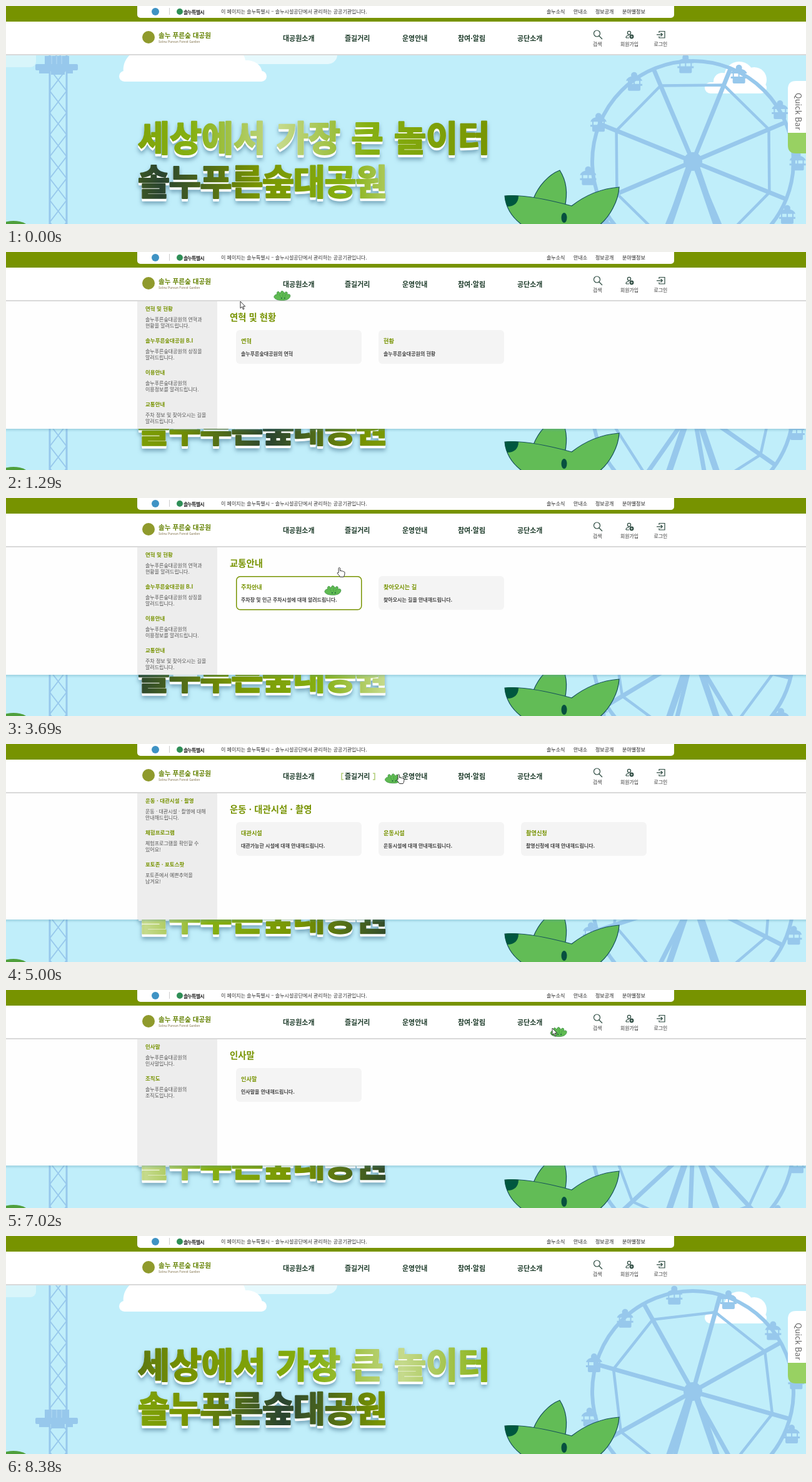
Animation, 1280 px wide and 349 px high, one loop 8.45 s. Source, as an HTML page:

```html
<!DOCTYPE html>
<html lang="ko">
<head>
<meta charset="utf-8">
<title>솔누푸른숲대공원</title>
<style>
html, body { margin: 0; width: 100%; height: 100%; overflow: hidden; background: #c0eefa; }
svg { display: block; width: 1280px; height: 349px; font-family: "Noto Sans CJK KR", "Noto Sans CJK", "Noto Sans", sans-serif; }
text { white-space: pre; }
#title { font-size: 55.5px; font-weight: 900; stroke-width: 2.5; stroke-linejoin: round;
  filter: drop-shadow(0 4px 0 #fff) drop-shadow(0 4px 3px rgba(50, 100, 130, .5)); }
</style>
</head>
<body>
<svg id="stage" viewBox="0 0 1280 349"></svg>
<script>
const LOOP = 8450, GREEN = '#779300', BLUE = '#97c8ec', PARK = '솔누푸른숲대공원';
const $ = id => document.getElementById(id);
const clamp = v => Math.max(0, Math.min(1, v));
const wave = (t, period) => Math.cos(2 * Math.PI * t / period);
const set = (id, attrs) => { for (const k in attrs) $(id).setAttribute(k, attrs[k]); };
const move = (id, x, y) => set(id, { transform: `translate(${x} ${y})` });

const label = (x, y, size, str, fill = '#333', weight = 400, more = '') =>
  `<text x="${x}" y="${y}" font-size="${size}" fill="${fill}" font-weight="${weight}" ${more}>${str}</text>`;
const box = (x, y, w, h, fill, r = 0, more = '') =>
  `<rect x="${x}" y="${y}" width="${w}" height="${h}" rx="${r}" fill="${fill}" ${more}/>`;

// Each menu: label, x, centre, items of [name, two lines, cards]
const menus = [
  ['대공원소개', 443, 468, [
    ['연혁 및 현황', `${PARK}의 연혁과`, '현황을 알려드립니다.',
      [['연혁', `${PARK}의 연혁`], ['현황', `${PARK}의 현황`]]],
    [`${PARK} B.I`, `${PARK}의 상징을`, '알려드립니다.',
      ['로고', '캐릭터', '상징'].map(s => [`${PARK} ${s}`, `솔누푸른숲 대공원의 ${s}`])],
    ['이용안내', `${PARK}의`, '이용정보를 알려드립니다.',
      [['이용안내', '이용정보를 안내해드립니다.']]],
    ['교통안내', '주차 정보 및 찾아오시는 길을', '알려드립니다.',
      [['주차안내', '주차장 및 인근 주차시설에 대해 알려드립니다.'],
       ['찾아오시는 길', '찾아오시는 길을 안내해드립니다.']]]]],
  ['즐길거리', 542, 562, [
    ['운동 · 대관시설 · 촬영', '운동 · 대관시설 · 촬영에 대해', '안내해드립니다.',
      [['대관시설', '대관가능한 시설에 대해 안내해드립니다.'],
       ['운동시설', '운동시설에 대해 안내해드립니다.'],
       ['촬영신청', '촬영신청에 대해 안내해드립니다.']]],
    ['체험프로그램', '체험프로그램을 확인할 수', '있어요!'],
    ['포토존 · 포토스팟', '포토존에서 예쁜추억을', '남겨요!']]],
  ['운영안내', 634, 654, [
    ['운영시간', `${PARK}의`, '운영시간입니다.', [['운영시간', '운영시간을 안내해드립니다.']]],
    ['편의시설', '편의시설을 확인할 수', '있어요!']]],
  ['참여·알림', 723, 745, [
    ['공지사항', `${PARK}의`, '소식을 알려드립니다.', [['공지사항', '공지사항을 안내해드립니다.']]],
    ['참여마당', '함께하는 행사를', '알려드립니다.']]],
  ['공단소개', 818, 838, [
    ['인사말', `${PARK}의`, '인사말입니다.', [['인사말', '인사말을 안내해드립니다.']]],
    ['조직도', `${PARK}의`, '조직도입니다.']]]
];

// Pointer path: time, x, y
const path = [[100, 1010, 380], [500, 445, 58], [540, 445, 58], [650, 458, 53], [1050, 458, 55],
  [1500, 303, 100], [1900, 296, 124], [2220, 282, 180], [2600, 268, 250], [2750, 278, 258],
  [3300, 485, 177], [3690, 531, 111], [3950, 560, 53], [4450, 566, 50], [5000, 626, 48],
  [5300, 655, 50], [5600, 720, 50], [6010, 745, 52], [6600, 830, 54], [6720, 874, 61],
  [7020, 874, 61], [7200, 880, 66], [7650, 960, 300], [7800, 990, 400]];

function pointer(t) {
  const i = path.findIndex(p => p[0] > t);
  if (i === 0) return path[0].slice(1);
  if (i < 0) return path[path.length - 1].slice(1);
  const [a, x, y] = path[i - 1], [b, x2, y2] = path[i], k = (t - a) / (b - a);
  return [x + (x2 - x) * k, y + (y2 - y) * k];
}

// The leaf trails the pointer: mean of its recent places
function leafAt(t) {
  let x = 13, y = 7;
  for (let k = 0; k < 10; k++) {
    const p = pointer(t - 40 * k);
    x += p[0] / 10;
    y += p[1] / 10;
  }
  return [x, y];
}

function sky() {
  let braces = '';
  for (let y = 66; y < 349; y += 35) braces += `M70 ${y}L97 ${y + 35}M97 ${y}L70 ${y + 35}`;
  let spokes = '', rim = [];
  for (let i = 0; i < 8; i++) {
    const a = (22 + 45 * i) * Math.PI / 180, x = 132 * Math.sin(a), y = -132 * Math.cos(a);
    spokes += `M0 0L${x * 1.22} ${y * 1.22}`;
    rim.push(`${x},${y}`);
  }
  const cars = Array.from({ length: 12 }, (_, i) => `<use href="#car" id="car${i}"/>`).join('');
  return `
  ${box(0, 0, 1280, 349, '#c0eefa')}
  ${box(-20, 60, 68, 38, '#d8f5fa', 9)}
  ${box(340, 60, 190, 33, '#e6f9fd', 15)}
  <g fill="#fff">
    ${box(181, 104, 236, 17, '#fff', 8.5)}
    <path d="M188 108C186 88 196 78 210 70H368C378 74 382 80 383 87C399 86 410 96 410 108Z"/>
    ${box(1118, 122, 99, 18, '#fff', 9)}
    <circle cx="1173" cy="113" r="24"/><circle cx="1197" cy="118" r="20"/><circle cx="1146" cy="121" r="14"/>
  </g>
  <g fill="none" stroke="${BLUE}">
    <path d="${braces}" stroke-width="1.8"/><path d="M70 78V349M97 78V349" stroke-width="3"/>
  </g>
  <g id="lift">
    ${box(62, 80, 39, 14, BLUE)}${box(47, 93, 68, 10, BLUE, 2)}${box(53, 102, 16, 6, BLUE)}
    ${box(72, 102, 22, 8, BLUE)}${box(97, 102, 10, 6, BLUE)}
    <path d="M73 80V93M81 80V93M89 80V93" stroke="#b4dcf4"/>
  </g>
  <g fill="none" stroke="${BLUE}">
    <circle cx="1099" cy="249" r="161" stroke-width="6"/>
    <g id="wheel"><path d="${spokes}" stroke-width="7"/>
      <polygon points="${rim.join(' ')}" stroke-width="4.5"/></g>
    <path d="M1096 249L1058 360M1102 249L1140 360" stroke-width="10"/>
  </g>
  <circle cx="1099" cy="249" r="15" fill="${BLUE}"/>
  ${cars}
  <ellipse cx="12" cy="358" rx="26" ry="14" fill="#4f9f3c"/>
  <g id="title">
    ${label(211, 225, 55.5, '세상에서 가장 큰 놀이터', 'url(#g1)', 900, 'stroke="url(#g1)" word-spacing="2"')}
    ${label(211, 295, 55.5, PARK, 'url(#g2)', 900, 'stroke="url(#g2)" letter-spacing="-1.3"')}
  </g>
  <g fill="#62bc56" stroke="#14505a" stroke-width="1.2">
    <path d="M844 308C852 288 868 270 886 263C897 280 899 300 894 322Z"/>
    <path d="M798 304C830 301 872 311 905 320C928 302 955 292 981 290C980 312 966 338 948 352H828C812 341 800 325 798 304Z"/>
    <path d="M798 304Q808 302 820 304C820 315 813 321 802 321Q798 312 798 304Z" fill="#00573f" stroke="none"/>
    <ellipse cx="893" cy="339" rx="4.5" ry="8" fill="#07503f" stroke="none"/>
  </g>
  <path d="M1280 120H1264Q1251 120 1251 133V203H1280Z" fill="#fff"/>
  <path d="M1280 236H1264Q1251 236 1251 223V203H1280Z" fill="#98d162"/>
  ${label(0, 0, 13, 'Quick Bar', '#666', 500, 'transform="translate(1263 139) rotate(90)"')}`;
}

function header() {
  const links = [[865, '솔누소식'], [908, '안내소'], [943, '정보공개'], [986, '분야별정보']];
  return `
  ${box(0, 0, 1280, 25, GREEN)}
  ${box(210, -8, 859, 27, '#fff', 5)}
  <circle cx="239" cy="9" r="6" fill="#3f93c4"/>
  <path d="M261.5 3V14" stroke="#ccc"/>
  <circle cx="278" cy="9" r="5" fill="#2f8f57"/>
  ${label(284, 13, 8, '솔누특별시', '#222', 700, 'letter-spacing="-.8"')}
  ${label(344, 12, 8, '이 페이지는 솔누특별시 – 솔누시설공단에서 관리하는 공공기관입니다.')}
  ${links.map(([x, s]) => label(x, 12, 8, s, '#222', 500)).join('')}
  ${box(0, 25, 1280, 53, '#fff')}${box(0, 77, 1280, 2, '#d9d9d9')}
  <circle cx="228" cy="50" r="10" fill="#8f9a2c"/>
  ${label(244, 51, 10.6, '솔누 푸른숲 대공원', '#648200', 700)}
  ${label(244, 59, 5, 'Solnu Pureun Forest Garden', '#7a6a40')}
  ${menus.map(([s, x]) => label(x, 56, 11, s, '#1d3b2a', 700)).join('')}
  <g fill="none" stroke="#2c4a40" stroke-width="1.2">
    <circle cx="945.5" cy="44" r="5"/><path d="M949 48L954 53"/>
    <circle cx="997" cy="43" r="2.6"/><path d="M992 51Q992 47 997 47M992 51H997"/>
    <circle cx="1001" cy="49" r="2.8" fill="#2c4a40"/><path d="M999.5 49H1002.5M1001 47.5V50.5" stroke="#fff" stroke-width=".8"/>
    <path d="M1045 43V40.500H1054V51H1045V48.500M1041 45.800H1050M1047.500 43L1050.300 45.800L1047.500 48.600"/>
  </g>
  ${[[939, '검색'], [983, '회원가입'], [1036.5, '로그인']].map(([x, s]) => label(x, 64, 7.9, s)).join('')}
  <path id="brackets" d="M-22 47H-25V57H-22M25 47H28V57H25" fill="none" stroke="#b4cf7c" stroke-width="1.6"/>`;
}

// Drop-down sheet for one menu, with the hovered side item and card lit
function sheet(menu, item, lit, card) {
  const items = menus[menu][3], [name, , , cards] = items[item];
  let s = box(0, 79, 1280, 205, '#fefefe') + box(210, 79, 128, 205, '#ededed');
  if (lit >= 0) s += box(210, 79 + 51 * lit, 128, 51, '#fff');
  items.forEach(([a, b, c], i) => {
    const y = 51 * i;
    s += label(223, 94 + y, 8.5, a, GREEN, 700) + label(223, 111 + y, 8, b, '#555') + label(223, 121 + y, 8, c, '#555');
  });
  s += label(358, 110, 14.4, name, GREEN, 700);
  cards.forEach(([a, b], i) => {
    const x = 368 + 228 * i;
    s += i === card ? box(x + .75, 125.75, 200, 53, '#fff', 6, `stroke="${GREEN}" stroke-width="1.5"`)
                    : box(x, 125, 201, 54, '#f4f4f4', 6);
    s += label(x + 8, 146, 9.2, a, GREEN, 700) + label(x + 8, 166, 8, b, '#444', 700);
  });
  return s;
}

const stops = [[0, '#2a4430'], [.38, '#779300'], [.75, '#86b012'], [1, '#c5da8c']]
  .map(([o, c]) => `<stop offset="${o}" stop-color="${c}"/>`).join('');
const gradient = id =>
  `<linearGradient id="${id}" gradientUnits="userSpaceOnUse" spreadMethod="reflect" y1="0" y2="0">${stops}</linearGradient>`;

$('stage').innerHTML = `
<defs>${gradient('g1')}${gradient('g2')}
  <linearGradient id="shade" x2="0" y2="1"><stop stop-color="#4a90a8" stop-opacity=".3"/><stop offset="1" stop-color="#4a90a8" stop-opacity="0"/></linearGradient>
  <clipPath id="clip"><rect id="slot" y="79" width="1280" height="0"/></clipPath>
  <g id="car" fill="${BLUE}">
    <circle cy="3" r="5"/><path d="M-13 12Q-11 5 0 4Q11 5 13 12Z"/>
    <path d="M-9 11V18M9 11V18M0 11V18" stroke="${BLUE}" stroke-width="2"/>
    <path d="M-13 17H13V20H10V26Q10 28 8 28H-8Q-10 28 -10 26V20H-13Z"/>
  </g>
</defs>
${sky()}
<g id="sheet" clip-path="url(#clip)"></g>
<rect id="edge" width="1280" height="5" fill="url(#shade)"/>
${header()}
<g id="leaf">
  <path d="M-13 2C-13 -1 -10 -3 -8 -2C-9 -5 -8 -7 -6 -7Q-4 -6 -3 -4Q-2 -8 0 -8Q3 -7 3 -4Q6 -8 8 -6Q9 -4 8 -2Q13 -4 13 0C12 5 7 7 1 7C-6 7 -11 6 -13 2Z" fill="#5fba52" stroke="#3a8f40" stroke-width=".8"/>
  <path d="M-5 -3L-2 2M1 -4V2M6 -3L4 2" stroke="#45a044" fill="none" stroke-width=".8"/>
  <circle cx="-1" cy="3.500" r=".9" fill="#0b4a38"/><circle cx="4" cy="3.500" r=".9" fill="#0b4a38"/>
</g>
<path id="arrow" d="M0 0V11L2.600 8.600L4.400 12.800L6 12L4.300 8H7.700Z" fill="#fff" stroke="#222" stroke-width=".9"/>
<path id="hand" d="M1 1.500Q2.300 -.5 3.500 1.500V6Q5 5 6 6.300Q7.500 5.600 8.300 7Q10 6.300 10.800 8V11Q10.500 13.500 9 15.500H3.500Q1.500 12.500 -.8 10Q-1 8 1 8.800Z" fill="#fff" stroke="#222" stroke-width=".9"/>`;

const switches = [3900, 5040, 5550, 6550];
let shown = '';

function draw(t) {
  if (t > 6010 && t < 6410) t = 6010;

  const mid = 425 - 235 * wave(t + 230, 2020);
  set('g1', { x1: mid + 750, x2: mid + 190 });
  set('g2', { x1: mid, x2: mid + 400 });
  move('title', 0, 5.5 - 5.5 * wave(t - 600, 2020));

  const turn = t * .01;
  set('wheel', { transform: `translate(1099 249) rotate(${turn})` });
  for (let i = 0; i < 12; i++) {
    const a = (turn - 4 + 30 * i) * Math.PI / 180;
    move('car' + i, 1099 + 168 * Math.sin(a), 247 - 168 * Math.cos(a));
  }

  // Fast fall, then an eased climb
  const p = (t + 1800) % 2400;
  move('lift', 0, p < 400 ? 250 * (p / 400) ** 2 : 125 + 125 * Math.cos(Math.PI * clamp((p - 400) / 600)));

  const [x, y] = pointer(t), [hx, hy] = pointer(t - 100);
  const menu = switches.filter(s => t >= s).length;
  const open = clamp((t - 640) / 220) * (1 - clamp((t - 7620) / 200));
  const height = (menu ? 202 : 204) * open;
  const side = Math.floor((hy - 79) / 51);
  const lit = open && hx > 210 && hx < 338 && side >= 0 && side < menus[menu][3].length ? side : -1;
  const item = menu || t < 1900 ? 0 : t < 2800 ? Math.max(0, lit) : 3;
  const col = Math.floor((hx - 368) / 228);
  const onCard = open === 1 && hx > 368 && hy > 125 && hy < 179 && (hx - 368) % 228 < 201
    && col < menus[menu][3][item][3].length;
  const card = onCard ? col : -1;

  const key = [menu, item, lit, card].join();
  if (key !== shown) $('sheet').innerHTML = sheet(menu, item, lit, card);
  shown = key;
  set('slot', { height });
  set('edge', { y: 79 + height, opacity: open ? 1 : 0 });

  const onNav = open > 0 && hy < 57;
  move('brackets', menus[menu][2], 0);
  set('brackets', { opacity: onNav ? 1 : 0 });
  const link = onNav || lit >= 0 || onCard;
  move('leaf', ...leafAt(t));
  move('arrow', x, y);
  move('hand', x, y);
  set('arrow', { opacity: link ? 0 : 1 });
  set('hand', { opacity: link ? 1 : 0 });
}

function tick() {
  draw(performance.now() % LOOP);
  requestAnimationFrame(tick);
}
tick();
</script>
</body>
</html>
```
